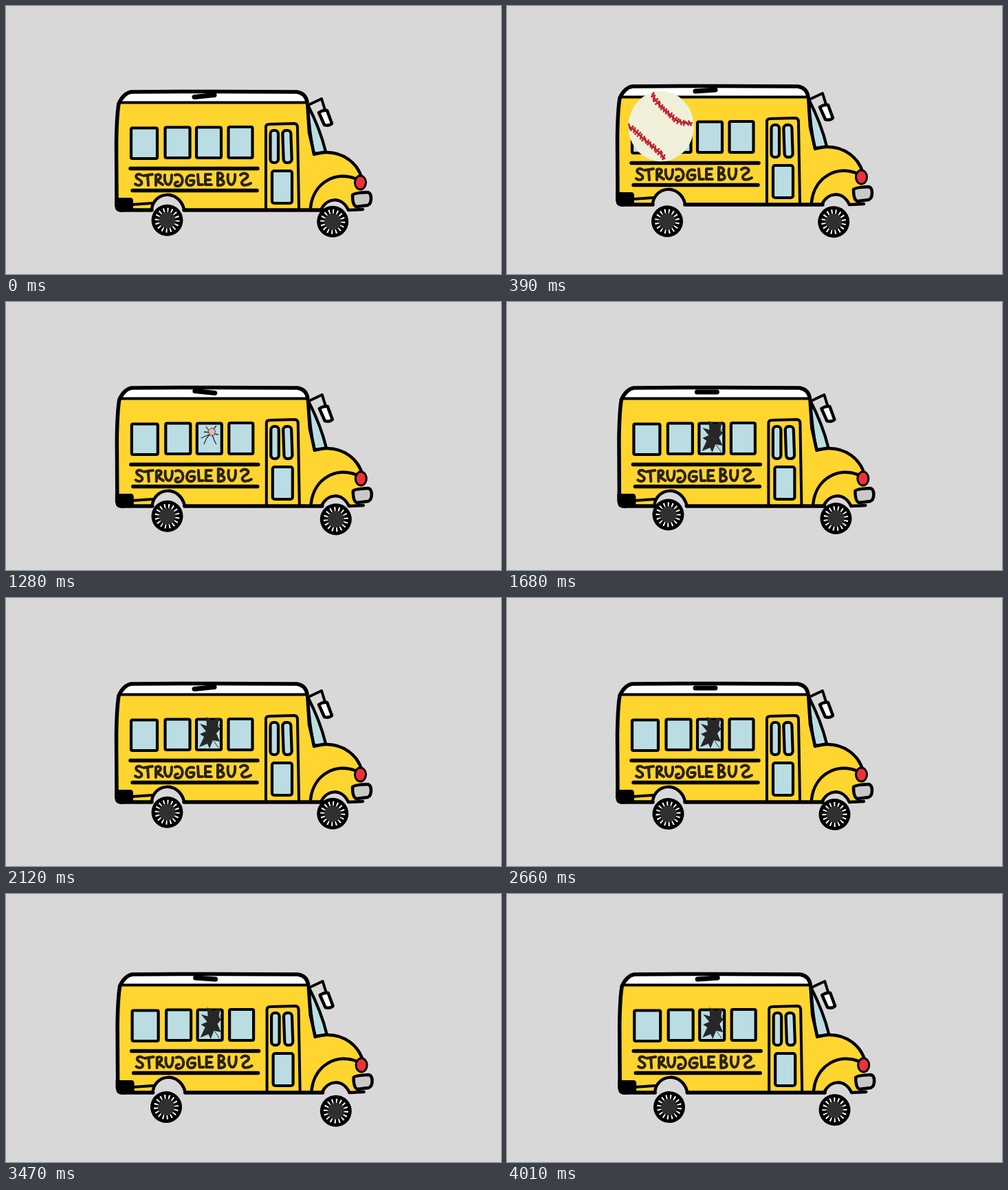
An HTML page that plays this animation: 720x390 px, repeating every 4.28 s.

```html
<!DOCTYPE html>
<html lang="en">
<head>
<meta charset="utf-8">
<title>Struggle bus</title>
<style>
  html, body { margin: 0; height: 100%; overflow: hidden; background: #d8d8d8; }
  svg { display: block; width: 100vw; height: 100vh; }
  .line { fill: none; stroke: #000; stroke-width: 4.5; stroke-linecap: round; stroke-linejoin: round; }
  .thick { stroke-width: 5.5; }
  .glass { fill: #badde3; stroke: #000; stroke-width: 4.2; stroke-linejoin: round; }
</style>
</head>
<body>
<svg viewBox="0 0 720 390">
  <g id="bus">
    <path fill="#ffd530" d="M165 139H437L464 213C490 212 512 230 517 250L518 268L506 276V297H498C490 277 468 277 459 297H259C254 270 217 270 212 297H163L161 190Z"/>
    <path fill="#fff" d="M165 140Q169 126 182 125H424Q436 126 437 140Z"/>
    <path class="line thick" d="M161 289L160.500 200Q161 160 164 142Q171 127 182 125Q300 124 423 125Q436 127 438 140"/>
    <path class="line" style="stroke-width:4" d="M165 140.500H437"/>
    <path id="mark" class="line" style="stroke-width:7"/>

    <path class="glass" d="M439 144Q457 179 465 212L448 216Q441 184 439 144Z"/>
    <path class="line" d="M438 140L441 184L448 215L464 213C492 212 511 230 517 249"/>
    <path class="line" style="stroke-width:4" d="M442 143L459 135L464 151"/>
    <path class="line" style="fill:#fff" d="M455 155Q461 151 467 152L474 171Q470 175 463 173Z"/>

    <rect class="glass" x="182" y="177.500" width="38" height="44.500" rx="2"/>
    <rect class="glass" x="231.500" y="176.500" width="36" height="44.500" rx="2"/>
    <rect class="glass" x="277" y="176.500" width="36" height="44.500" rx="2"/>
    <rect class="glass" x="323.500" y="176" width="35" height="45" rx="2"/>

    <g id="crack" fill="none" stroke="#30262a" stroke-width="1.300">
      <path d="M297 191L290 181M297 190L287 189M298 189L305 180M299 191L308 193M296 192L291 198L287 207M299 193L302 201L305 207M297 192L283 198"/>
      <path fill="#e3b9a8" stroke="#6b4a44" stroke-width="1" d="M293 187L299 183L304 187L302 194L296 194Z"/>
    </g>
    <g id="hole">
      <path fill="#272727" d="M291 173L300 178L310 174L308 187L312 190L306 197L311 209L301 207L296 219L293 212L281 217L288 202L282 198L291 194L282 183L292 186Z"/>
      <path fill="none" stroke="#333" d="M309 187L313 181M302 208L309 218"/>
    </g>

    <path class="line thick" d="M181 236.500H366M184 268.500H365"/>
    <path role="img" aria-label="STRUGGLE BUS" class="line" style="stroke:#2b220c;stroke-width:4" d="
      M197 246C193 243 187 246 190 250C193 253 199 254 197 259C195 262 190 261 188 259
      M200 247L213 245M206 247L207 261
      M218 261V246C226 243 228 250 219 254L228 260
      M231 246C229 264 242 265 241 246
      M246 246C258 241 261 262 249 262C244 262 245 256 250 256
      M273 247C262 242 258 261 268 261C274 261 274 255 273 254H268
      M279 245L280 260H286
      M298 245H290V260H299M290 253H297
      M308 243V261C320 262 319 252 309 252C319 250 316 242 308 243
      M323 245C320 265 335 265 333 245
      M341 246C346 241 354 245 351 249C348 253 342 253 343 258C344 262 351 261 356 258"/>

    <path class="line" style="stroke-width:4" d="M378 294V176Q378 172 383 172L419 171Q424 171 424 177L426 294"/>
    <rect class="glass" x="384.500" y="181" width="11.500" height="47" rx="5"/>
    <rect class="glass" x="403" y="181" width="12" height="47" rx="5" transform="rotate(-2 409 204)"/>
    <rect class="glass" x="387" y="240" width="29" height="47" rx="3"/>

    <path class="line thick" d="M162 295Q164 298 172 297H212M259 297H459"/>
    <path class="line" style="stroke-width:4" d="M183 289L212 287"/>
    <path d="M158 279H182Q185 280 185 284V295Q183 299 178 299H168Q159 298 158 291Z"/>
    <path class="line" d="M212 295C216 269 252 267 259 296M458 297C466 279 488 276 498 297L519 296"/>
    <path class="line" d="M443 293C447 257 480 239 510 252"/>
    <ellipse cx="515.500" cy="257" rx="8" ry="10" fill="#f0303a" stroke="#000" stroke-width="3"/>
    <path class="line" style="fill:#c9c9c9" d="M504 275Q506 272 526 271Q531 272 531 280Q531 288 526 290L510 292Q504 291 504 275Z"/>
  </g>

  <defs>
    <g id="tyre">
      <circle r="23"/>
      <circle r="12" fill="#303030"/>
      <circle r="15" fill="none" stroke="#fff" stroke-width="6" pathLength="48" stroke-dasharray="1 2"/>
    </g>
  </defs>
  <use href="#tyre" id="rear"/>
  <use href="#tyre" id="front"/>

  <g id="ball">
    <ellipse rx="48" ry="51.500" fill="#f0f0da"/>
    <g fill="none" stroke="#c0232c" stroke-width="2.500">
      <path id="seam" d="M-13 -48C-7 -32 6 -24 22 -9Q32 -3 46 -5M-47 0C-38 5 -32 13 -24 20Q-6 33 6 48"/>
      <path id="stitches"/>
    </g>
  </g>
</svg>
<script>
const LOOP = 4280, BEAT = 270, BALL_STEP = 130, HIT = 1250, BREAK = 1680;
const $ = id => document.getElementById(id);
const move = (id, x, y, more = "") => $(id).setAttribute("transform", `translate(${x} ${y}) ${more}`);
const show = (id, on) => $(id).style.display = on ? "" : "none";

// Short red stitches across both seams
const seam = $("seam"), seamLength = seam.getTotalLength();
let stitches = "";
for (let d = 2; d < seamLength - 2; d += 4.5) {
  const p = seam.getPointAtLength(d), q = seam.getPointAtLength(d + 1);
  const a = Math.atan2(q.y - p.y, q.x - p.x) + 1.2 + 0.4 * Math.sin(d * d);
  const x = 4.5 * Math.cos(a), y = 4.5 * Math.sin(a);
  stitches += `M${p.x - x} ${p.y - y}L${p.x + x} ${p.y + y}`;
}
$("stitches").setAttribute("d", stitches);

// The bus hops on every other beat and creeps forward late in each set of eight.
function drawBus(k) {
  const a = k * Math.PI / 4, tilt = -1.5 * Math.cos(a);
  move("bus", Math.max(0, k - 3) * 0.8, k % 2 ? -8 : 0);
  move("rear", 234.5 - 1.5 * Math.sin(2 * a), 311.7 + 2.3 * Math.sin(a), `rotate(${k * 7})`);
  move("front", 477.5 - 2.5 * Math.cos(a - 0.4), 315 - 1.2 * Math.cos(a), `rotate(${k * 9})`);
  $("mark").setAttribute("d", `M274 ${131 - tilt}L303 ${131 + tilt}`);
}

// The ball arcs up from the lower left and shrinks into the third window.
function drawBall(t) {
  const u = Math.floor(t / BALL_STEP) * BALL_STEP / HIT, v = 1 - u;
  move("ball", 297 - 200 * v ** 2.7, 188 - 55 * v + 235 * v ** 6, `scale(${1.1 * (1 - u * u)})`);
}

function draw() {
  const t = performance.now() % LOOP;
  drawBus(Math.floor((t + 40) / BEAT) % 8);
  show("ball", t >= 30 && t < HIT);
  if (t < HIT) drawBall(t);
  show("crack", t >= HIT && t < BREAK);
  show("hole", t >= BREAK);
  requestAnimationFrame(draw);
}
draw();
</script>
</body>
</html>
```
